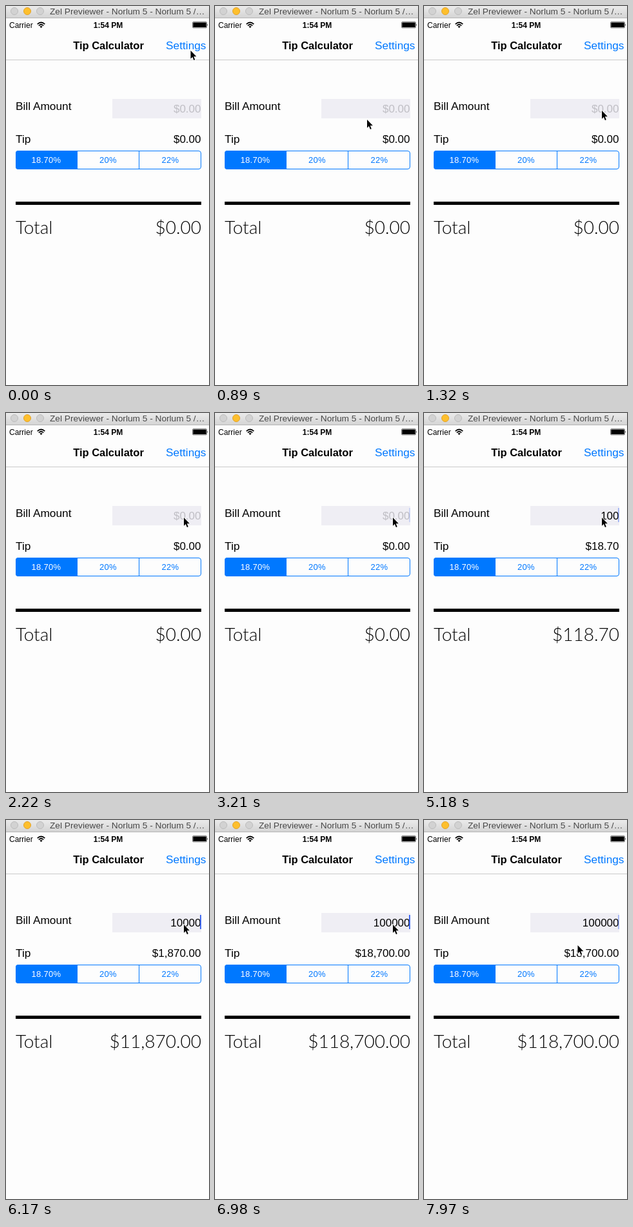
Recreate the animation shown at these times as an HTML page. Size 315x587 px, loop 8000 ms.

```html
<!DOCTYPE html>
<html lang="en">
<head>
<meta charset="utf-8">
<title>Tip Calculator</title>
<style>
  html, body { margin: 0; height: 100%; overflow: hidden; background: #fdfdfd; }
  svg { display: block; width: 100%; height: 100%; }
  text { font: 17px "Liberation Sans", Arial, sans-serif; white-space: pre; }
  .end { text-anchor: end; }
  .mid { text-anchor: middle; }
  .blue { fill: #0078ff; }
  .window { font-size: 13.7px; fill: #474747; }
  .status { font-size: 12px; }
  .bold { font-weight: bold; }
  .heading { font-size: 16.5px; }
  .label { font-size: 17.3px; }
  .segment { font-size: 13px; letter-spacing: .3px; }
  .total { font: 300 28px Lato, sans-serif; }
  .empty { fill: #bfbec4; }
</style>
</head>
<body>
<svg viewBox="0 0 315 587">
  <defs>
    <linearGradient id="chrome" x2="0" y2="1">
      <stop stop-color="#ebebeb"/><stop offset="1" stop-color="#d3d3d3"/>
    </linearGradient>
  </defs>
  <rect width="315" height="587" fill="#fdfdfd"/>

  <!-- Window bar -->
  <rect width="315" height="19" fill="url(#chrome)"/>
  <path d="M0 18.5H315" stroke="#b5b5b5"/>
  <g fill="#d2d2d2" stroke="#bcbcbc">
    <circle cx="13" cy="8" r="5.5"/>
    <circle cx="33" cy="8" r="5.5" fill="#fdbf2d" stroke="#e3a32a"/>
    <circle cx="53" cy="8" r="5.5"/>
  </g>
  <text class="window" x="68" y="13">Zel Previewer - Norlum 5 - Norlum 5 /…</text>

  <!-- Status bar -->
  <text class="status" x="5" y="34">Carrier</text>
  <path d="M48.7 28.2Q54.5 22.8 60.3 28.2M50.8 30.5Q54.5 27 58.2 30.5"
        fill="none" stroke="#000" stroke-width="1.7"/>
  <path d="M52.3 31.8Q54.5 30 56.7 31.8L54.5 34Z"/>
  <text class="status bold mid" x="158.5" y="34">1:54 PM</text>
  <rect x="289.5" y="24.5" width="22" height="9.5" rx="1.5" fill="none" stroke="#000" stroke-width=".5"/>
  <rect x="290.3" y="25.5" width="20.4" height="7.5" rx=".6"/>
  <path d="M312.4 27.5q1.4 1.7 0 3.4z"/>

  <!-- Navigation bar -->
  <text class="heading bold mid" x="159" y="67">Tip Calculator</text>
  <text class="label blue end" x="310.5" y="67">Settings</text>
  <path d="M0 83.5H315" stroke="#cacaca"/>

  <!-- Form -->
  <text class="label" x="15" y="161">Bill Amount</text>
  <rect x="165" y="144" width="138" height="30" fill="#efeef4"/>
  <text id="bill" class="end" x="302.5" y="164.5"></text>
  <rect id="caret" x="301" y="147" width="2" height="22" fill="#426bf2"/>
  <text class="label" x="15" y="211.5">Tip</text>
  <text id="tip" class="end" x="302.5" y="211.5"></text>

  <path class="blue" d="M111 224H19a4 4 0 0 0-4 4v21a4 4 0 0 0 4 4H111Z"/>
  <rect x="15.5" y="224.5" width="287" height="28" rx="3.5" fill="none" stroke="#0078ff"/>
  <path d="M110.5 224V253M206.5 224V253" stroke="#0078ff"/>
  <text class="segment mid" x="62.5" y="243" fill="#fff">18.70%</text>
  <text class="segment mid blue" x="158.5" y="243">20%</text>
  <text class="segment mid blue" x="255" y="243">22%</text>

  <rect x="15" y="303" width="288" height="5"/>
  <text class="total" x="15" y="353">Total</text>
  <text id="total" class="total end" x="303" y="353"></text>

  <path id="cursor" d="M.5 1V13.7L3.4 11L5.4 16L7.3 15.2L5.3 10.3H9.4Z"
        stroke="#fff" stroke-width="1.8" paint-order="stroke" stroke-linejoin="round"/>
</svg>
<script>
  const LOOP = 8000;
  const TIP_RATE = 0.187;
  const TYPED = "100000";
  const FOCUS_TIME = 1500;
  const KEY_TIMES = [3660, 3930, 4190, 5810, 6170, 6980];
  const CURSOR_START = { x: 286, y: 68 };
  const CURSOR_MOVES = [
    { from: 640, to: 890, x: 235.5, y: 175 },
    { from: 890, to: 1320, x: 275.5, y: 161 },
    { from: 7830, to: 7970, x: 238, y: 193 }
  ];

  const $ = id => document.getElementById(id);
  const clamp = value => Math.min(1, Math.max(0, value));
  const smooth = u => u * u * (3 - 2 * u);
  const money = amount => "$" + amount.toLocaleString("en-US",
    { minimumFractionDigits: 2, maximumFractionDigits: 2 });

  function cursorAt(time) {
    let { x, y } = CURSOR_START;
    for (const move of CURSOR_MOVES) {
      const u = smooth(clamp((time - move.from) / (move.to - move.from)));
      x += (move.x - x) * u;
      y += (move.y - y) * u;
    }
    return [x, y];
  }

  // The blink restarts with every key: hold, fade out, stay hidden, fade in.
  function caretOpacity(time) {
    if (time < FOCUS_TIME) return 0;
    const lastInput = [FOCUS_TIME, ...KEY_TIMES].findLast(t => t <= time);
    const phase = (time - lastInput) % 1050;
    return clamp(Math.max((700 - phase) / 200, (phase - 950) / 100));
  }

  function draw(time) {
    const typed = TYPED.slice(0, KEY_TIMES.filter(t => t <= time).length);
    const amount = Number(typed);
    $("bill").textContent = typed || money(0);
    $("bill").classList.toggle("empty", !typed);
    $("tip").textContent = money(amount * TIP_RATE);
    $("total").textContent = money(amount * (1 + TIP_RATE));
    $("caret").setAttribute("opacity", caretOpacity(time));
    $("cursor").setAttribute("transform", `translate(${cursorAt(time)})`);
  }

  const begin = performance.now();
  function tick() {
    draw((performance.now() - begin) % LOOP);
    requestAnimationFrame(tick);
  }
  tick();
</script>
</body>
</html>
```
